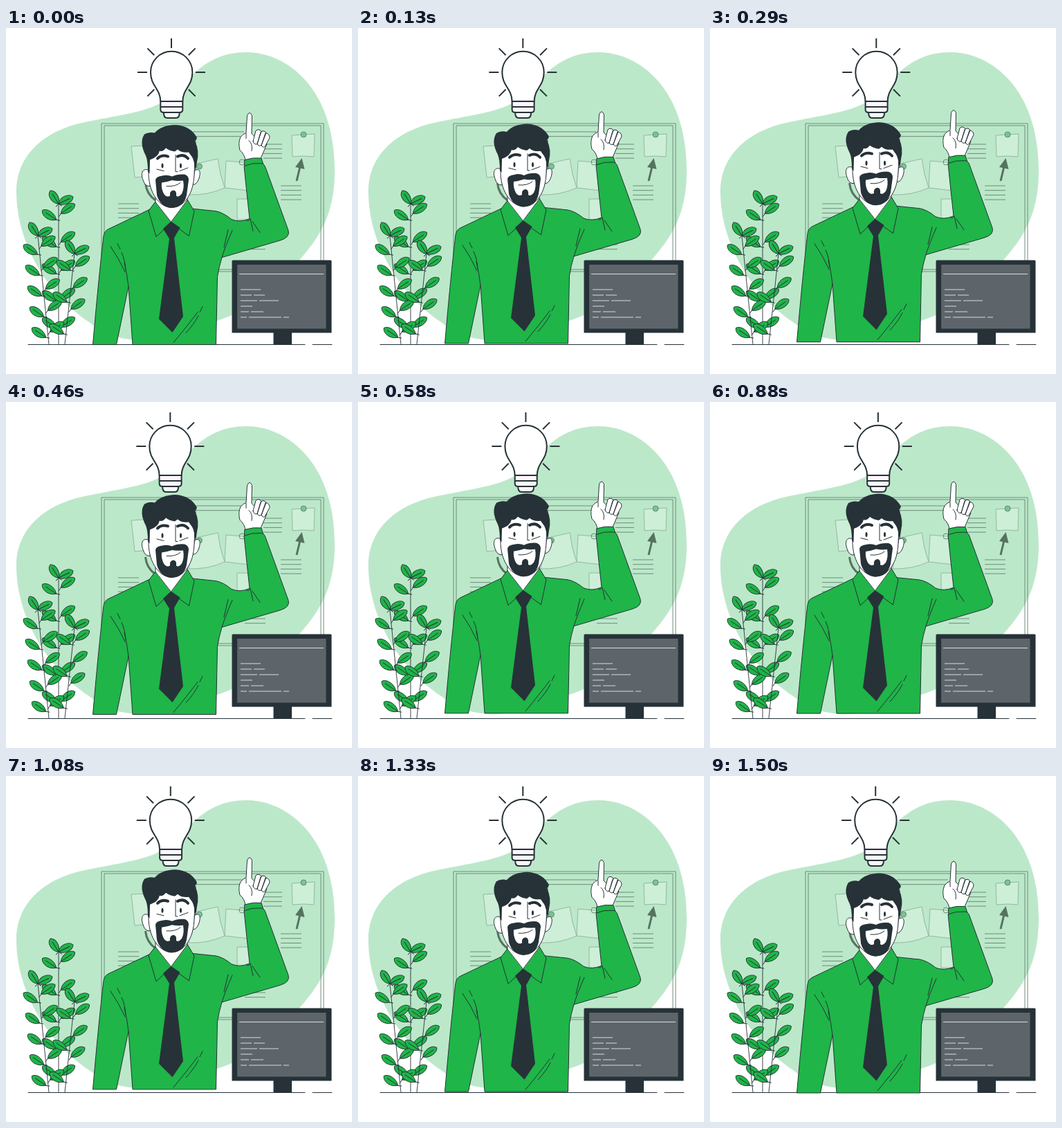
An HTML page that plays this animation: 500x500 px, repeating every 1.54 s.

```html
<!DOCTYPE html>
<html lang="en">
<head>
<meta charset="utf-8">
<title>Bright idea</title>
<style>
  html, body { margin: 0; width: 100%; height: 100%; overflow: hidden; background: #fff; }
  svg { display: block; width: 100vw; height: 100vh; }
  .ink { fill: none; stroke: #263238; stroke-linecap: round; stroke-linejoin: round; }
  .dark { fill: #263238; stroke: none; }
  .green { fill: #1fb548; }
  .white { fill: #fff; }
  .board { fill: none; stroke: #62826f; stroke-width: .9; }
  .note { fill: #cdeed7; stroke: #8db39b; }
  .pin { fill: #78c592; }
</style>
</head>
<body>
<svg viewBox="0 0 500 500">
  <path fill="#bce8ca" d="M347 35C410 35 475 92 475 205C475 282 445 312 405 357C375 392 350 408 305 423C265 436 235 451 195 451C165 451 142 442 120 425C60 385 15 310 15 237C15 180 60 148 110 137C160 126 200 123 230 105C262 80 285 35 347 35Z"/>

  <g class="board">
    <path d="M138 138H459V352H138ZM142 141H455V349H142Z"/>
    <path id="notes-text"/>
    <g class="note">
      <path d="M181 171L214 169L217 213L186 216Z"/>
      <path d="M271 197L306 189Q309 212 316 231Q292 242 264 241Z"/>
      <path d="M318 192L353 195L351 235L316 231Q317 211 318 192Z"/>
      <path d="M334 247H366V277H334Z"/>
      <path d="M413 155L446 153L445 186Q429 184 414 186Z"/>
    </g>
    <circle class="pin" cx="279.5" cy="200" r="4"/>
    <circle cx="341" cy="194" r="4"/>
    <circle class="pin" cx="430" cy="154" r="4"/>
    <path stroke="#56735f" stroke-width="3" d="M420 221L425 200M201.500 224Q203 240 216 249"/>
    <path fill="#56735f" stroke="none" d="M427.500 188L418 201L431.500 204Z"/>
  </g>

  <path class="ink" stroke-width="1" d="M32 457.500H432M443 457.500H471"/>

  <g id="plant" class="ink" stroke-width=".9"></g>

  <g id="man" class="ink" stroke-width="1">
    <path class="white" d="M346 192Q345 183 338 177Q335 166 339 158Q343 153 347 152L348.500 127Q352 119 355.500 127L355 153L360 158L377 168L368 189Z"/>
    <path class="white" d="M357 164L361 149Q365 145 369 150L363 168Q359 170 357 164ZM363 168L368 151Q372 147 376 152L369 170Q365 172 363 168ZM369 170L375 152Q381 153 381 159L374 172Q371 174 369 170Z"/>
    <path d="M347 153V160M351 163Q357 168 355 178"/>
    <path class="green" d="M345 191Q357 187 369 188.500L372 198L345 201Z"/>
    <path class="green" d="M210 261.500L150 290Q142 293 141 301Q134 360 125.500 458H159.500L177 374L183 458H303.500L305.500 360Q308 345 312 332L396 307.500Q411 303 408 293L375 202Q373 196 368 196Q355 195 344 200Q348 240 352 276Q338 282 326 277Q314 267 303 265L264 261Z"/>
    <path d="M177 374Q175 356 171 340M161 312L165 320M167 325Q172 335 173 350M151 316Q163 333 172 353M327 293Q316 318 312 332M321 292L315 317M347 278Q350 281 353 276L357 294M356 280L367 296M242 455Q262 431 277 411M260 441Q272 428 278 416M280 411L284 403"/>
    <path class="white" d="M216 235V254L238 284L262 252V235Z"/>
    <path class="green" d="M215.500 252L206 264.500L217 302L239 282ZM262.500 249L272 265L264.500 301L238 282Z"/>
    <path class="dark" d="M238.500 280L227 290.500L236 305L221 421L240.500 440.500L256 417.500L243 304L251.500 289Z"/>
    <path class="white" d="M207 206C198 202 194 209 198 220Q201 230 208 229ZM273 206C281 202 282 210 278 220Q275 227 270 227Z"/>
    <path class="white" d="M206 165V212C207 240 222 259 239 260C258 259 271 240 272 212L274 165Z"/>
    <path class="dark" d="M207.500 211L205 208Q205 192 202 185Q192 166 200 154Q206 150 215 152Q224 141 245 140.500Q267 142 276 159Q275 163 273 164Q280 178 276 194L274 208Q272 192 269 187Q266 183 264 180Q253 181 248 176L244 179Q236 178 231 174Q226 180 222 178Q220 187 208 191Z"/>
    <path stroke-width="4" d="M219 189Q225 183 234 186M248 186Q257 182 263 189"/>
    <ellipse class="dark" cx="226" cy="199.500" rx="1.500" ry="3.500"/>
    <ellipse class="dark" cx="252.500" cy="199.500" rx="1.500" ry="3.500"/>
    <path d="M245 184V208L248 208M218 204.500L228 207M251 207L263 202.500"/>
    <path class="dark" d="M216 220Q217 215 226 214Q233 212 240 215Q248 211 258 212Q264 214 264 220L261 242Q257 260 239 260.500Q223 259 218 242Z"/>
    <path class="white" stroke="none" d="M225 224Q233 223 240 220.500Q248 222 256 221Q258 232 254 240Q249 246 246 243Q247 235 241.500 235Q236 236 237 243Q232 246 228 240Q224 232 225 224Z"/>
    <path d="M232 229Q245 230 252 224"/>
  </g>

  <g class="ink">
    <path class="dark" d="M328 335.500H469Q470.500 335.500 470.500 337V440.500H326.500V337Q326.500 335.500 328 335.500ZM386.500 440H413V458H386.500Z"/>
    <path fill="#5d656b" d="M334 341.500H463V435H334Z"/>
    <path id="code" stroke="#d9dcdd" stroke-width="1.200" stroke-linecap="butt"/>
  </g>

  <g id="bulb" class="ink" stroke-width="2">
    <path id="rays" stroke-linecap="butt"/>
    <path class="white" d="M223.500 106C223 87 209.200 84 209.200 64a30.200 30.200 0 0 1 60.400 0C269.600 84 256 87 255.500 106Z"/>
    <path fill="#fbf5fc" d="M223.500 106H255.500V118Q255.500 122 251 122Q251 130 246 130H233Q228 130 228 122Q223.500 122 223.500 118ZM223.500 114H255.500M227 122H252"/>
  </g>
</svg>
<script>
const $ = id => document.getElementById(id);
const repeat = (count, make) => Array.from({ length: count }, (_, i) => make(i)).join('');

// Ruled text and code on the board and the monitor
const rows = (x, y, width, count, gap = 6.7) => repeat(count, i => `M${x} ${y + i * gap}h${width}`);
$('notes-text').setAttribute('d', rows(270, 150, 74, 2) + rows(372, 168, 27, 4) +
  rows(397, 228, 30, 4) + rows(162, 254, 30, 4) + rows(345, 313, 30, 2));

const CODE = ['29', '16 16', '24 28', '17', '12 18', '9 47 8'];
const codeRow = (words, i) => `M339 ${378 + i * 8}` + words.split(' ').map(w => `h${w}m3 0`).join('');
$('code').setAttribute('d', 'M337 355.500H459' + CODE.map(codeRow).join(''));

// Seven rays around the bulb, none towards its base
$('rays').setAttribute('d', repeat(7, i => {
  const angle = (i - 5) * Math.PI / 4, x = Math.cos(angle), y = Math.sin(angle);
  return `M${239.2 + 35 * x} ${64 + 35 * y}L${239.2 + 49 * x} ${64 + 49 * y}`;
}));

function leaf(x, y, dx, dy) {
  const size = Math.hypot(dx, dy), angle = Math.atan2(dy, dx) * 180 / Math.PI;
  return `<g transform="translate(${x} ${y}) rotate(${angle})">
    <path class="green" d="M0 0C${size * .25} -8 ${size * .85} -8 ${size} 0C${size * .85} 7 ${size * .25} 7 0 0Z"/>
    <path d="M-5 2L0 0H${size * .75}"/></g>`;
}

// A stem ends in a pair of leaves and carries evenly spaced ones on each side.
function stem({ root, tip, top, left, right }) {
  const xAt = y => root + (tip - root) * (457 - y) / (457 - top);
  const side = (dir, { from, gap, count }) => repeat(count, i => {
    const y = from + i * gap;
    return leaf(xAt(y) + dir * 3.5, y, dir * 20, -13.5);
  });
  return `<path d="M${root} 457L${tip} ${top}"/>` + leaf(tip, top, -12, -19) +
    leaf(tip, top, 21, -10) + side(-1, left) + side(1, right);
}
$('plant').innerHTML = [
  { root: 76, tip: 76, top: 254, left: { from: 277, gap: 39, count: 5 }, right: { from: 268, gap: 41, count: 5 } },
  { root: 62, tip: 46, top: 300, left: { from: 327, gap: 30, count: 5 }, right: { from: 315, gap: 31, count: 5 } },
  { root: 85, tip: 99, top: 326, left: { from: 350, gap: 46, count: 3 }, right: { from: 344, gap: 31, count: 3 } }
].map(stem).join('');

const FPS = 24, LOOP = 1540, LIFT = 10;
const SHAKE = [0, -1, 2, -4, 4, -4];
const shakeKey = i => SHAKE[5 - Math.abs(5 - i)];

function move(id, x, y) {
  $(id).setAttribute('transform', `translate(${x} ${y})`);
}

// Poses step at 24 per second; the 1.5 s move rests briefly before the loop restarts.
function draw(time) {
  const step = Math.floor((time % LOOP + 4) * FPS / 1000);
  const phase = Math.min(1, (step + .75) / 36);
  const key = Math.floor(phase * 10), part = phase * 10 - key;
  move('man', 0, -LIFT * (1 - Math.abs(1 - 2 * phase)));
  move('bulb', part ? shakeKey(key) * (1 - part) + shakeKey(key + 1) * part : shakeKey(key), 0);
}

let start;
function tick(now) {
  start ??= now;
  draw(now - start);
  requestAnimationFrame(tick);
}
draw(0);
requestAnimationFrame(tick);
</script>
</body>
</html>
```
